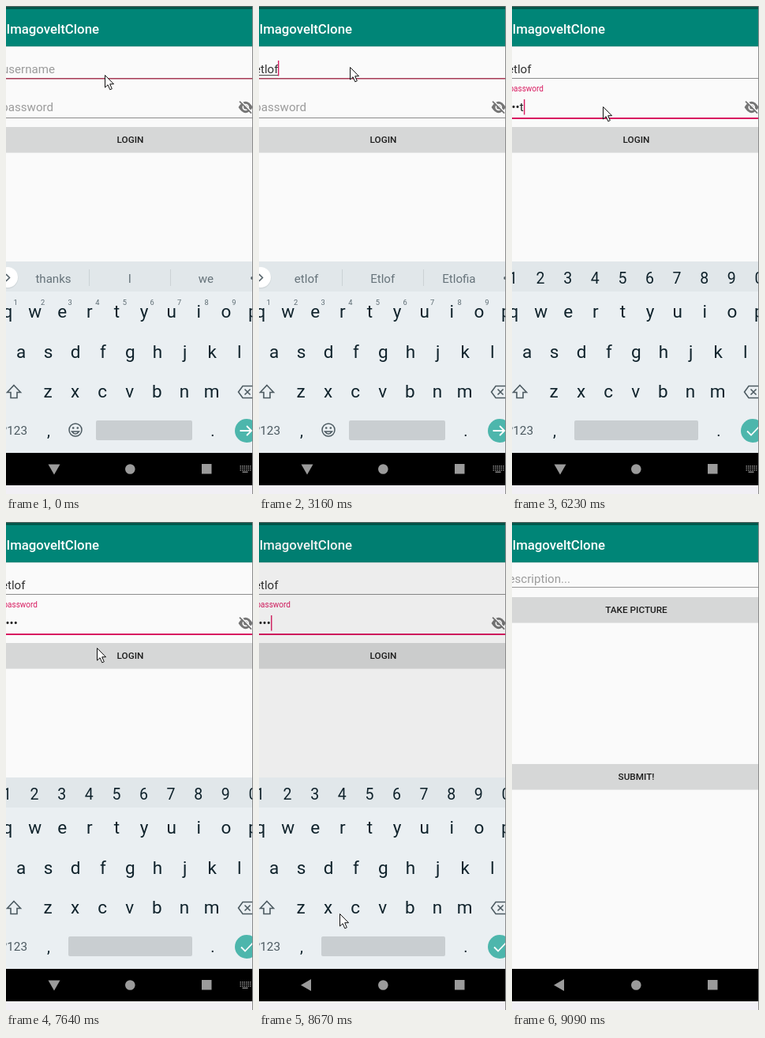
An HTML page with a canvas for the animation above (9.34 s loop, 313 by 617 pixels).

```html
<!DOCTYPE html>
<html lang="en">
<head>
<meta charset="utf-8">
<title>Login screen</title>
<style>
html, body { margin: 0; width: 100%; height: 100%; overflow: hidden; background: #fafafa; }
canvas { display: block; width: 313px; height: 617px; }
</style>
</head>
<body>
<canvas id="stage"></canvas>
<script>
const W = 313, H = 617, LOOP = 9340, PITCH = 34.6;
const ACCENT = '#d81b60', HINT = '#9b9b9b', KEY = '#10232c', GRAY = '#757575';
const canvas = document.getElementById('stage');
const ratio = window.devicePixelRatio || 1;
canvas.width = W * ratio;
canvas.height = H * ratio;
const c = canvas.getContext('2d');

// Each step is [start time, ...values]; the latest one already begun applies.
const MOUSE = [
  [0, 125, 87], [1060, 120, 82], [1180, 115, 77], [3690, 115, 87], [3840, 115, 100],
  [3960, 115, 116], [4080, 115, 127], [6600, 115, 132], [6720, 115, 140], [6840, 115, 149],
  [6960, 115, 156], [7080, 115, 159], [8160, 113, 215], [8280, 109, 340], [8400, 105, 445],
  [8520, 103, 487], [8670, 102, 495], [8790, 95, 566], [8940, -50, 0]
];
const USER = [[0, ''], [2260, 'e'], [2660, 'et'], [2910, 'etlo'], [3160, 'etlof']];
const SUGGESTIONS = [
  [0, 'thanks', 'I', 'we'], [2260, 'e', 'every', 'each'], [2660, 'et', 'etc', 'eternal'],
  [2910, 'etlo', 'etc', 'settle'], [3160, 'etlof', 'Etlof', 'Etlofia']
];
const PASSWORD = [[0, ''], [5150, 't'], [5520, '•e'], [5800, '••s'], [6230, '•••t'], [7640, '••••']];
const CARET = [[0, 0], [2260, 1], [3690, 0], [5150, 1], [6600, 0], [7080, 1], [7640, 0], [8160, 1]];
const FLOAT = [[0, 0], [4320, .04], [4440, .96], [4590, 1]];
const RIPPLE = [[0, 0], [7890, 110], [8010, 330], [8160, 0]];

const at = (steps, t) => steps.findLast(step => t >= step[0]).slice(1);

function rect(x, y, w, h, color) {
  c.fillStyle = color;
  c.fillRect(x, y, w, h);
}

function text(value, x, y, size, color, align = 'center', weight = 400) {
  c.font = `${weight} ${size}px Roboto, sans-serif`;
  c.textAlign = align;
  c.fillStyle = color;
  c.fillText(value, x, y);
  return c.measureText(value).width;
}

function disc(x, y, r, color) {
  c.fillStyle = color;
  c.beginPath();
  c.arc(x, y, r, 0, 7);
  c.fill();
}

function fillPath(d, color) {
  c.fillStyle = color;
  c.fill(new Path2D(d));
}

function line(d, color, width) {
  c.strokeStyle = color;
  c.lineWidth = width;
  c.stroke(new Path2D(d));
}

function clipped(x, y, w, h, draw) {
  c.save();
  c.beginPath();
  c.rect(x, y, w, h);
  c.clip();
  draw();
  c.restore();
}

function button(label, y) {
  rect(0, y, W, 32, '#d6d7d7');
  rect(0, y + 32, W, 1, '#e6e6e6');
  text(label, 157.5, y + 20.4, 11.75, '#1c1c1c', 'center', 500);
}

function appBar() {
  rect(0, 0, W, 565, '#fafafa');
  rect(0, 1, W, 3, '#00574b');
  rect(0, 4, W, 47, '#008577');
  rect(0, 51, W, 1, '#d5dfdd');
  text('ImagoveltClone', 118, 34.5, 16.8, '#fff', 'right', 500);
}

function eye() {
  fillPath('M294.5 128Q303.5 113.500 312.800 128Q303.5 142.500 294.500 128Z', GRAY);
  disc(303.7, 128, 4.3, '#fafafa');
  disc(303.7, 128, 2.5, GRAY);
  line('M297 119.500L313 135.500', '#fafafa', 1.6);
  line('M296 120.700L311 135.700', GRAY, 1.7);
}

function caret(x, y) {
  rect(x, y, 1.4, 19.5, ACCENT);
}

function loginPage(t) {
  appBar();
  const onPassword = t >= 4200;
  const [user] = at(USER, t), [password] = at(PASSWORD, t);
  const [caretOn] = at(CARET, t), [lift] = at(FLOAT, t), [ripple] = at(RIPPLE, t);

  if (user) {
    const width = text(user, -6, 85, 15.1, '#333', 'left');
    if (!onPassword) rect(-6, 87, width, 1, '#444');
    if (caretOn && !onPassword) caret(width - 6.5, 69);
  } else {
    text('username', 62, 85, 15.1, HINT, 'right');
  }
  rect(0, 91, W, onPassword ? 1 : 1.5, onPassword ? '#8c8c8c' : '#a73b56');

  text('password', 60 - 20 * lift, 133 - 25 * lift, 15.1 - 5.1 * lift, lift > .5 ? ACCENT : HINT, 'right');
  const width = text(password, -5.6, 133, 15.1, '#222', 'left');
  if (caretOn && onPassword) caret(width - 5.6 + .3, 118);
  rect(0, 141, W, onPassword ? 2 : 1, onPassword ? ACCENT : '#8c8c8c');
  eye();

  button('LOGIN', 153);
  if (ripple) clipped(0, 154, W, 30, () => disc(115, 168, ripple, 'rgba(0,0,0,.12)'));
}

function postPage() {
  appBar();
  text('Description...', 74, 76.5, 15.1, HINT, 'right');
  rect(0, 82, W, 1, '#989898');
  button('TAKE PICTURE', 95);
  button('SUBMIT!', 306);
}

function keyRow(letters, x, y, size = 22.5) {
  [...letters].forEach((letter, i) => text(letter, x + PITCH * i, y, size, KEY));
}

function keyboard(t) {
  const numeric = t >= 4440;
  rect(0, 323, W, 242, '#eaeff2');
  rect(0, 323, W, 38, '#e1e7ea');

  if (numeric) {
    keyRow('1234567890', 1.5, 351, 19.5);
  } else {
    at(SUGGESTIONS, t).forEach((word, i) => text(word, 60 + 96.7 * i, 349.5, 15.1, '#66737a'));
    rect(105, 333, 1, 21, '#cbd2d5');
    rect(208, 333, 1, 21, '#cbd2d5');
    disc(2, 344, 13.5, '#d2d8db');
    disc(2, 343, 13, '#fff');
    line('M0 339L4.500 343.500L0 348', '#56646b', 1.6);
    disc(312, 344, 2, '#56646b');
    for (let i = 0; i < 9; i++) text(i + 1, 12 + PITCH * i, 378, 9.3, '#5c6b72');
  }

  keyRow('qwertyuiop', 2, 394);
  keyRow('asdfghjkl', 19, 444.5);
  keyRow('zxcvbnm', 53, 495);
  line('M10 479.500L18.500 488.500H14V495.500H6V488.500H1.500Z', '#4c5a61', 1.6);
  line('M316 480.500H300L294.500 488L300 495.500H316M302.500 484.500L309.500 491.500M309.500 484.500L302.500 491.500', '#4c5a61', 1.6);

  text('?123', 27, 542, 15.3, '#4c5a61', 'right');
  text(',', 54, 544, 20, KEY);
  text('.', 262, 544, 20, KEY);
  const left = numeric ? 79 : 114;
  c.fillStyle = '#c9ced1';
  c.beginPath();
  c.roundRect(left, 524, 236 - left, 25, 2);
  c.fill();
  if (!numeric) {
    line('M96 536A8 8 0 1 1 80 536A8 8 0 1 1 96 536M83.500 538Q88 544 92.500 538Z', '#4c5a61', 1.5);
    disc(85.2, 533.5, 1.3, '#4c5a61');
    disc(90.8, 533.5, 1.3, '#4c5a61');
  }
  disc(305, 537, 15, '#4db6ac');
  line(numeric ? 'M298 537.500L303 542.500L313 532' : 'M296.500 537H311M305 531L311 537L305 543', '#fff', 1.8);
}

function navBar(keyboardOpen) {
  rect(0, 565, W, 41, '#000');
  fillPath(keyboardOpen ? 'M53.500 579.500H68.500L61 592.500Z' : 'M53 585.500L66 578V593Z', '#9b9b9b');
  disc(157.3, 585.5, 6.3, '#9b9b9b');
  rect(248, 579, 12.5, 12.5, '#9b9b9b');
  if (keyboardOpen) {
    for (let row = 0; row < 3; row++)
      for (let col = 0; col < 6; col++) rect(296.5 + col * 2.5, 581 + row * 2.5, 1.5, 1.5, '#858585');
    rect(299.5, 588.5, 7, 1.5, '#858585');
  }
}

function pointer(x, y) {
  c.save();
  c.translate(x + .5, y + .5);
  const arrow = 'M0 0V15.500L3.600 12.200L6.300 18.300L8.800 17.200L6.200 11.200H11Z';
  fillPath(arrow, '#fff');
  line(arrow, '#111', 1);
  c.restore();
}

function draw(t) {
  c.setTransform(ratio, 0, 0, ratio, 0, 0);
  c.clearRect(0, 0, W, H);
  if (t < 8940) loginPage(t);
  if (t >= 8670 && t < 8940) rect(0, 0, W, 565, 'rgba(0,0,0,.052)');

  if (t >= 8790) {
    const top = t < 8940 ? 150 : 0;
    const shift = t < 8940 ? 8 : t < 9090 ? 2 : 0;
    clipped(0, top, W, 565 - top, () => {
      c.translate(0, shift);
      postPage();
    });
  }

  if (t < 8940) clipped(0, 323, W, 242, () => {
    if (t >= 8790) {
      c.globalAlpha = .5;
      c.translate(0, 16);
    }
    keyboard(t);
  });

  navBar(t < 8670);
  rect(0, 606, W, 11, '#f1eff5');
  rect(0, 0, W, 1, '#5c6664');
  rect(312, 0, 1, H, '#8b8b8b');
  pointer(...at(MOUSE, t));
}

function tick() {
  draw(performance.now() % LOOP);
  requestAnimationFrame(tick);
}
tick();
</script>
</body>
</html>
```
